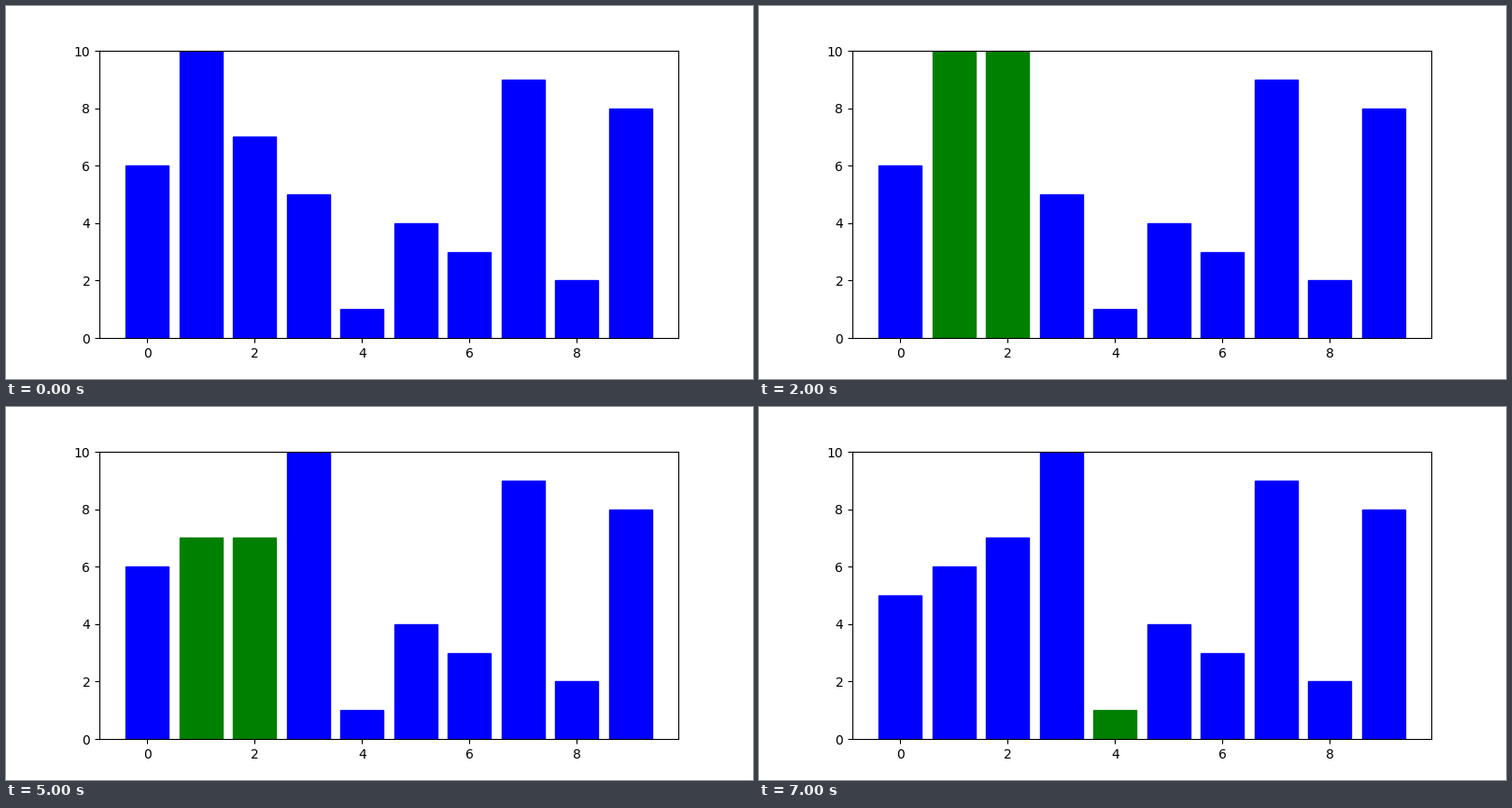
Animation of 800 by 400 pixels, one loop 8 s. Source, as a matplotlib script:

```python
from itertools import islice

import matplotlib.pyplot as plt
from matplotlib.animation import FuncAnimation

VALUES = [6, 10, 7, 5, 1, 4, 3, 9, 2, 8]
STEPS = 8
STEP_MS = 1000


def insertion_sort(values):
    """Yield (heights, highlighted bars) for every visible step."""
    a = list(values)
    yield a[:], ()
    for i in range(2, len(a)):
        key = a[i]
        yield a[:], (i,)
        j = i
        while j > 0 and a[j - 1] > key:
            a[j] = a[j - 1]
            yield a[:], (j - 1, j)
            j -= 1
        a[j] = key
    yield a[:], ()


steps = list(islice(insertion_sort(VALUES), STEPS))

fig, ax = plt.subplots(figsize=(8, 4), dpi=100)
bars = ax.bar(range(len(VALUES)), VALUES)
ax.set_ylim(0, 10)


def update(n):
    heights, active = steps[n]
    for k, (bar, height) in enumerate(zip(bars, heights)):
        bar.set_height(height)
        bar.set_color("green" if k in active else "blue")
    return bars


anim = FuncAnimation(fig, update, frames=STEPS, interval=STEP_MS,
                     repeat=True, repeat_delay=0)
plt.show()
```
